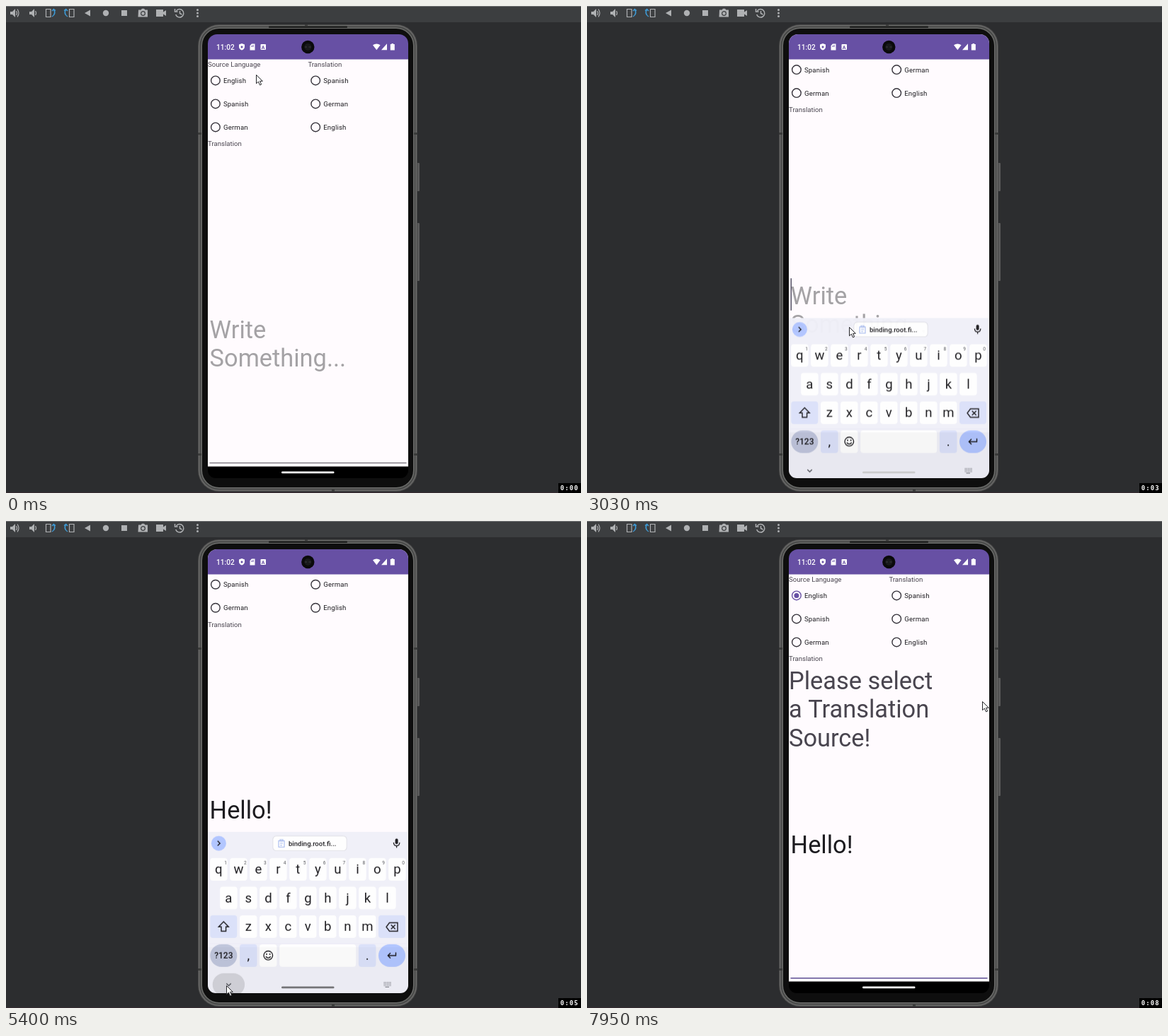
These frames come from a looping animation (812 by 689 pixels, 8 s). An HTML page with a canvas:

```html
<!DOCTYPE html>
<html lang="en">
<head>
<meta charset="utf-8">
<title>Translator app demo</title>
<style>
html, body { margin: 0; width: 812px; height: 689px; overflow: hidden; background: #2c2d2f; }
canvas { display: block; }
</style>
</head>
<body>
<canvas id="stage" width="812" height="689"></canvas>
<script>
const stage = document.getElementById('stage').getContext('2d');
const layer = new OffscreenCanvas(812, 689).getContext('2d');
let ctx = stage;
const LOOP = 8000;
const INK = '#1c1b1f', SOFT = '#49454f', PURPLE = '#6750a4', ICON = '#afb1b3', BLUE = '#3e9bd6';

// Timeline, in ms
const mousePath = [
  [0, 353, 97], [60, 353, 97], [90, 353, 98], [1440, 353, 98], [1640, 295, 105], [1900, 295, 105],
  [2380, 370, 454], [4550, 370, 454], [4970, 311, 657], [5480, 311, 657], [5900, 391, 321],
  [5950, 391, 321], [6160, 413, 332], [6290, 413, 332], [6780, 301, 107], [7260, 301, 107], [7860, 558, 255]
];
const typing = [[0, ''], [3410, 'H'], [3560, 'He'], [3850, 'Hel'], [3910, 'Hell'], [4090, 'Hello'], [4500, 'Hello!']];
const composing = [[0, ''], [3470, 'H'], [3650, 'He'], [3910, 'Hel'], [4090, 'Hell'], [4290, 'Hello'], [4500, '']];
const seconds = [0, 960, 1960, 2950, 3910, 4970, 5900, 6780, 7860];

const clamp = v => Math.max(0, Math.min(1, v));
const smooth = v => v * v * (3 - 2 * v);
const latest = (list, t) => list.filter(item => item[0] <= t).pop()[1];

function box(x, y, w, h, r, color) {
  ctx.fillStyle = color;
  ctx.beginPath();
  ctx.roundRect(x, y, w, h, r);
  ctx.fill();
}
const disc = (x, y, r, color) => box(x - r, y - r, 2 * r, 2 * r, r, color);
function fill(d, color) {
  ctx.fillStyle = color;
  ctx.fill(new Path2D(d), 'evenodd');
}
function stroke(d, color, width = 1.2) {
  ctx.strokeStyle = color;
  ctx.lineWidth = width;
  ctx.stroke(new Path2D(d));
}
function ring(x, y, r, color, width) {
  ctx.strokeStyle = color;
  ctx.lineWidth = width;
  ctx.beginPath();
  ctx.arc(x, y, r, 0, 7);
  ctx.stroke();
}
function label(s, x, y, size, color, { align = 'left', weight = 400, spacing = 0, family = 'Roboto, sans-serif' } = {}) {
  ctx.font = `${weight} ${size}px ${family}`;
  ctx.letterSpacing = spacing + 'px';
  ctx.textAlign = align;
  ctx.fillStyle = color;
  ctx.fillText(s, x, y);
}
const big = (s, x, y, color) => label(s, x, y, 34.4, color);
function bigWidth(s) {
  ctx.font = '400 34.4px Roboto, sans-serif';
  ctx.letterSpacing = '0px';
  return ctx.measureText(s).width;
}

function drawToolbar() {
  box(0, 0, 812, 23, 0, '#3c3e40');
  box(0, 0, 812, 1, 0, '#6f7173');
  for (const x of [0, 27]) fill(`M${x + 6} 8h3l4-4v12l-4-4h-3z`, ICON);
  stroke('M14.5 7q2 3 0 6M16 4.5q4 5.5 0 11M41.5 7q2 3 0 6', ICON);
  stroke('M56.5 4.5h6.5v11h-6.5zM89.5 4.5h6.5v11h-6.5z', ICON);
  stroke('M65 15q6-4 2.5-10M65 7l2.3-2.5 2.7 2M87 15q-6-4-2.5-10M87 7l-2.3-2.5-2.7 2', BLUE, 1.5);
  fill('M111 10l8-4.5v9z', ICON);
  disc(141, 10, 4.2, ICON);
  box(163, 6, 8, 8, 0, ICON);
  fill('M187 5.5h3.5l1.5-1.7h3l1.5 1.7h3.5v10h-13.5z', ICON);
  ring(193.5, 10.5, 2.8, '#3c3e40', 1.2);
  fill('M212 5h10v3.5l4-2.5v8l-4-2.5v3.5h-10z', ICON);
  stroke('M240.5 7a5.7 5.7 0 1 1-.8 5M238.5 4v4h4M245.5 7v3.5l3 1.5', ICON, 1.5);
  for (const y of [5.5, 10, 14.5]) disc(270.5, y, 1.5, ICON);
}

function drawBody() {
  const shell = (inset, color) => box(271 + inset, 26 + inset, 310 - 2 * inset, 661 - 2 * inset, 30 - inset, color);
  box(580, 222, 4, 40, 1, '#5a5a5a');
  box(580, 307, 4, 82, 1, '#5a5a5a');
  shell(0, '#484848');
  shell(1, '#6a6a69');
  shell(2.5, '#484948');
  shell(4.5, '#6c6d6b');
  shell(6, '#0e0e0e');
  box(371, 28.5, 111, 2.5, 1, '#1d1e1d');
  for (const y of [179, 633]) {
    box(271, y, 5, 3, 0, '#3a3b3a');
    box(576, y, 5, 3, 0, '#3a3b3a');
  }
  box(422, 26, 4, 3, 0, '#3a3b3a');
  box(460, 684, 4, 3, 0, '#3a3b3a');
}

function drawStatusBar() {
  box(285, 40, 283, 35.5, 0, PURPLE);
  label('11:02', 297, 62, 10.1, '#fff', { weight: 500 });
  fill('M333 53l4 1.6v3q0 3.5-4 5-4-1.5-4-5v-3zM333 56l-1.8 2 1.8 2 1.8-2z', '#fff');
  fill('M347 53.5h4.5v9h-7v-6.5zM346.5 56h1v2h-1zM348.5 55h1v3h-1z', '#fff');
  box(359.5, 54, 7.5, 8, 1, '#fff');
  label('A', 363.2, 60.8, 7, PURPLE, { align: 'center', weight: 700 });
  fill('M523.3 62.3l-5.3-7q5.3-3.6 10.6 0z', '#fff');
  fill('M530 62.3h8v-9z', '#fff');
  fill('M544.5 53h2.5v1h1.8v8.5h-6v-8.5h1.7z', '#fff');
  disc(426.3, 58, 9.2, '#0a0a0b');
  disc(426.3, 58, 5, '#18191b');
  box(422, 57.5, 3, 1, 0, '#3a3b40');
  box(427.5, 57.5, 3, 1, 0, '#3a3b40');
}

function radio(x, y, name, chosen) {
  ring(x, y, 6.3, chosen ? PURPLE : '#36333b', 1.4);
  if (chosen) disc(x, y, 3.5 * chosen, PURPLE);
  label(name, x + 11, y + 3.6, 9.63, INK, { spacing: .17 });
}

function drawPage(t) {
  const focused = t >= 2500, typed = latest(typing, t), left = 287.6;
  box(285, 75, 283, 576.5, 0, '#fffbfe');
  label('Source Language', 285, 86.3, 9.63, SOFT);
  label('Translation', 426.4, 86.3, 9.63, SOFT);
  ['English', 'Spanish', 'German'].forEach((name, i) =>
    radio(295.9, 105.4 + 33 * i, name, i ? 0 : clamp((t - 7120) / 150)));
  ['Spanish', 'German', 'English'].forEach((name, i) => radio(437.2, 105.4 + 33 * i, name, 0));
  label('Translation', 285, 198.3, 9.63, SOFT);
  if (t >= 7180)
    ['Please select', 'a Translation', 'Source!'].forEach((s, i) => big(s, 285, 238 + 40.4 * i, SOFT));

  if (typed) big(typed, left, 470, INK);
  else ['Write', 'Something...'].forEach((s, i) => big(s, left, 470 + 40.4 * i, '#a4a2a5'));
  const marked = bigWidth(latest(composing, t));
  if (marked) box(left, 472.2, marked, 1.7, 0, INK);
  const blinkOn = t < 4940 || Math.floor((t - 4940) / 501) % 2;
  if (t >= 2650 && blinkOn) box(left + bigWidth(typed), 433.5, 1.3, 45.5, 0, '#3f3a52');
  box(287.5, 646, 278, focused ? 1.4 : 1, 0, focused ? '#5d4c92' : '#57535c');
}

function key(x, y, w, color, s, r = 4) {
  box(x - w / 2, y - 16, w, 32, r, color);
  if (s) label(s, x, y + 6, 18.6, INK, { align: 'center' });
}

function drawKeyboard(t) {
  const white = '#fefefe', pale = '#dbe1f9', accent = '#b1c5ff';
  box(285, 436, 283, 240, 0, '#f0f0f8');
  disc(300.4, 452.2, 10.5, accent);
  stroke('M298.8 448.8l3.4 3.4-3.4 3.4', INK, 1.4);
  if (t >= 2950) {
    box(376.5, 441.5, 105, 21.5, 5, '#dcdce3');
    box(377.3, 442.2, 103.4, 20, 4.5, white);
    stroke('M385 448.5h8v9h-8zM387 447h4v2h-4zM387 452h4M387 455h3', '#a5b9ee', 1.1);
    label('binding.root.fi...', 399, 455.8, 9.5, INK, { weight: 500 });
  }
  box(549.6, 445.5, 4, 7.8, 2, INK);
  stroke('M547.4 451q0 4.6 4.2 4.6t4.2-4.6M551.6 455.5v3', INK, 1.3);

  [...'qwertyuiop'].forEach((s, i) => {
    key(300.4 + 28 * i, 489, 24.5, white, s);
    label((i + 1) % 10, 310 + 27.9 * i, 481.5, 6.6, '#55565c', { align: 'center' });
  });
  [...'asdfghjkl'].forEach((s, i) => key(314.4 + 28 * i, 529.5, 24.5, white, s));
  [...'zxcvbnm'].forEach((s, i) => key(342.3 + 28 * i, 570, 24.5, white, s));
  key(307.3, 570, 38, pale);
  stroke('M307.3 563l7 7.2h-3.7v6.3h-6.6v-6.3h-3.7z', INK, 1.4);
  key(545, 570, 38, pale);
  stroke('M541.5 564.5h11.5v12h-11.5l-4.5-6zM543.7 567.5l6 6M549.7 567.5l-6 6', INK, 1.4);

  key(307.3, 611, 38, '#bfc5dc', '', 16);
  label('?123', 307.3, 615.2, 12, INK, { align: 'center', weight: 500 });
  key(342.3, 611, 24.5, pale, ',');
  key(370.3, 611, 24.5, white);
  ring(370.3, 610.8, 6.3, INK, 1.3);
  disc(368, 609, 1, INK);
  disc(372.6, 609, 1, INK);
  stroke('M366.8 612.3q3.5 4 7 0', INK, 1.3);
  key(440.2, 611, 108, white);
  key(510.2, 611, 24.5, pale, '.');
  key(545, 611, 38, accent, '', 16);
  stroke('M550.5 606.5v4.5h-11M543 607.3l-3.7 3.7 3.7 3.7', INK, 1.4);

  const ripple = clamp((t - 5100) / 120) * clamp((5560 - t) / 150);
  if (ripple) box(291.7, 636, 45.4, 32, 16, `rgba(0,0,0,${.12 * ripple})`);
  stroke('M311.3 650.5l3.2 3.2 3.2-3.2', '#44464c');
  for (let row = 0; row < 3; row++)
    for (let i = 0; i < 5; i++) box(533.6 + 2.2 * i, 648.5 + 2.2 * row, 1.2, 1.2, 0, '#777981');
  box(535.5, 655, 5.5, 1, 0, '#777981');
}

// 0 = keyboard hidden, 1 = fully raised
function keyboardLevel(t) {
  if (t < 2790 || t > 5650) return 0;
  if (t < 5380) return 1 - .596 * (1 - clamp((t - 2800) / 290)) ** 2;
  return 1 - smooth((t - 5380) / 270);
}

function pillColor(t) {
  const mix = t < 4500 ? clamp((t - 2900) / 350) : t < 5900 ? 1 - .62 * clamp((t - 5500) / 350)
    : .38 * (1 - clamp((t - 6330) / 300));
  const v = Math.round(255 - 139 * mix);
  return `rgb(${v},${v},${v + 3 * mix})`;
}

// The keyboard fades as one piece, so it is painted on its own layer first
function fadeKeyboard(t, level) {
  ctx = layer;
  ctx.clearRect(0, 0, 812, 689);
  drawKeyboard(t);
  ctx = stage;
  ctx.globalAlpha = level ** 1.23;
  ctx.drawImage(layer.canvas, 0, 218 * (1 - level));
  ctx.globalAlpha = 1;
}

function drawScreen(t) {
  const level = keyboardLevel(t);
  ctx.save();
  ctx.beginPath();
  ctx.roundRect(285, 40, 283, 628, [13, 13, 11, 11]);
  ctx.clip();
  box(285, 40, 283, 628, 0, '#000');
  ctx.save();
  ctx.translate(0, -49.5 * level);
  drawPage(t);
  ctx.restore();
  if (level) fadeKeyboard(t, level);
  drawStatusBar();
  box(389, 658.6, 74.5, 2.6, 1.3, pillColor(t));
  ctx.restore();
}

function drawMouse(t) {
  let i = mousePath.findIndex(p => p[0] > t);
  if (i < 0) i = mousePath.length;
  const [t0, x0, y0] = mousePath[i - 1];
  const [t1, x1, y1] = mousePath[i] || [LOOP, x0, y0];
  const k = smooth((t - t0) / (t1 - t0));
  ctx.save();
  ctx.translate(x0 + (x1 - x0) * k + .5, y0 + (y1 - y0) * k + .5);
  const arrow = 'M0 0V12.2L2.9 9.6 5 14.4 7.1 13.5 5 8.8H8.8Z';
  fill(arrow, '#fdfdfd');
  stroke(arrow, '#26262a', 1);
  ctx.restore();
}

function drawClock(t) {
  box(780, 675, 32, 14, 0, '#000');
  label('0:0' + (seconds.filter(s => s <= t).length - 1), 782.8, 685.2, 9, '#fff',
    { weight: 700, spacing: 1.1, family: '"DejaVu Sans Mono", monospace' });
}

function frame() {
  const t = performance.now() % LOOP;
  box(0, 0, 812, 689, 0, '#2c2d2f');
  box(0, 688, 812, 1, 0, '#382b32');
  drawToolbar();
  drawBody();
  drawScreen(t);
  drawMouse(t);
  drawClock(t);
  requestAnimationFrame(frame);
}
frame();
</script>
</body>
</html>
```
